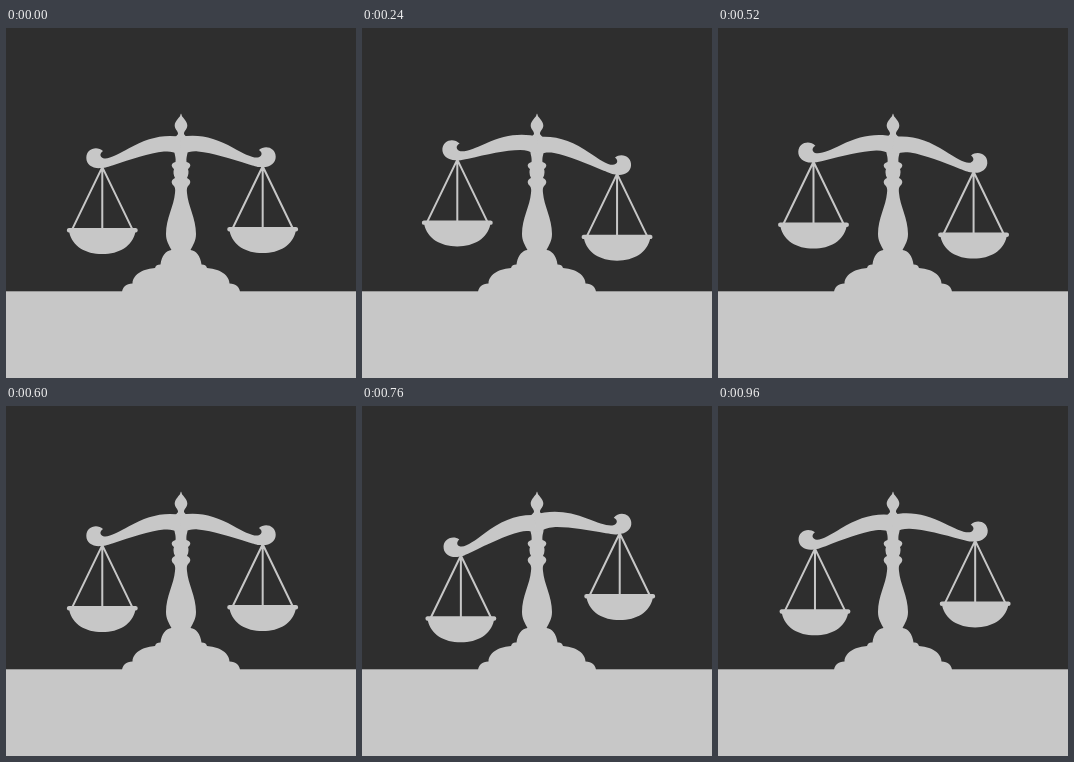
An HTML page that plays this animation: 350 px wide and 350 px high, repeating every 1 s.

```html
<!DOCTYPE html>
<html lang="en">
<head>
<meta charset="utf-8">
<title>Scales</title>
<style>
  html, body { margin: 0; width: 100%; height: 100%; overflow: hidden; background: #2e2e2e; }
  svg { display: block; width: 100vw; height: 100vh; fill: #c7c7c7; }
  .cords { fill: none; stroke: #c7c7c7; stroke-width: 2; }
</style>
</head>
<body>
<svg viewBox="0 0 350 350">
  <defs>
    <path id="arm" d="M175.5 109C157 105.500 140 110.500 123 120C113 125.500 104 130.500 98.500 130
      C94.500 129.500 92.500 125.500 97 122.500C91 117 80.300 120 80.300 129.300C80.300 136 87 140.500 95 139.500
      C100 139.500 102 138 107 136.800C125 131 143 125 158 123.500C164 123 168 124 172 126H175.500Z"/>
    <path id="post" d="M175.5 85.500C174 89.500 168.700 93 168.700 97.500C168.700 101 172 103 172 105.500
      C172 107.500 169 108 168.500 111V125C169 128 170 130 169.500 134C165 135.500 164.500 138 168 141
      C167 144 167.500 147 169 150C165.500 151.500 164.500 154.500 167.500 157.500C169 159 169.500 161 169 165
      C168 178 160 190 160 206C160 213 163 217 165.500 222
      C160 222.500 155.500 228 154.500 236.500C151.500 236.500 149.500 237.500 149 240
      C140 240.500 127 245 126.500 255.500C120 256 116.500 259 116 264H175.500Z"/>
    <g id="pan">
      <path class="cords" d="M0 -1L-30 61M0 -1V61M0 -1L30 61"/>
      <path d="M-33.500 59.800H33.500A2.200 2.200 0 0 1 33 64.200C30 77.800 17 85.800 0 85.800
        S-30 77.800 -33 64.200A2.200 2.200 0 0 1 -33.500 59.800Z"/>
    </g>
  </defs>
  <rect y="263.3" width="350" height="87"/>
  <use href="#post"/>
  <use href="#post" transform="matrix(-1 0 0 1 350 0)"/>
  <g id="beam">
    <use href="#arm"/>
    <use href="#arm" transform="matrix(-1 0 0 1 350 0)"/>
  </g>
  <use id="left" href="#pan"/>
  <use id="right" href="#pan"/>
</svg>
<script>
  const pivot = { x: 175, y: 126 };
  const drop = 13.7;
  // time in ms, vertical travel of the right pan
  const keys = [[0, -0.5], [240, 7.2], [400, 13.4], [600, -0.5], [680, -6],
                [800, -13.9], [840, -12.2], [960, -4], [1000, -0.5]];
  const beam = document.getElementById('beam');
  const pans = [['left', -78.8], ['right', 81.6]].map(([id, arm]) => ({ el: document.getElementById(id), arm }));

  function travel(t) {
    const i = keys.findIndex(k => k[0] > t);
    const [t0, a] = keys[i - 1], [t1, b] = keys[i];
    return a + (b - a) * (t - t0) / (t1 - t0);
  }

  function draw(now) {
    const t = Math.floor(now % 1000 / 40) * 40;
    const angle = Math.asin(travel(t) / 81);
    const c = Math.cos(angle), s = Math.sin(angle);
    beam.setAttribute('transform', `rotate(${angle * 180 / Math.PI} ${pivot.x} ${pivot.y})`);
    for (const { el, arm } of pans) {
      const x = pivot.x + arm * c - drop * s;
      const y = pivot.y + arm * s + drop * c;
      el.setAttribute('transform', `translate(${x} ${y})`);
    }
    requestAnimationFrame(draw);
  }
  draw(0);
</script>
</body>
</html>
```
